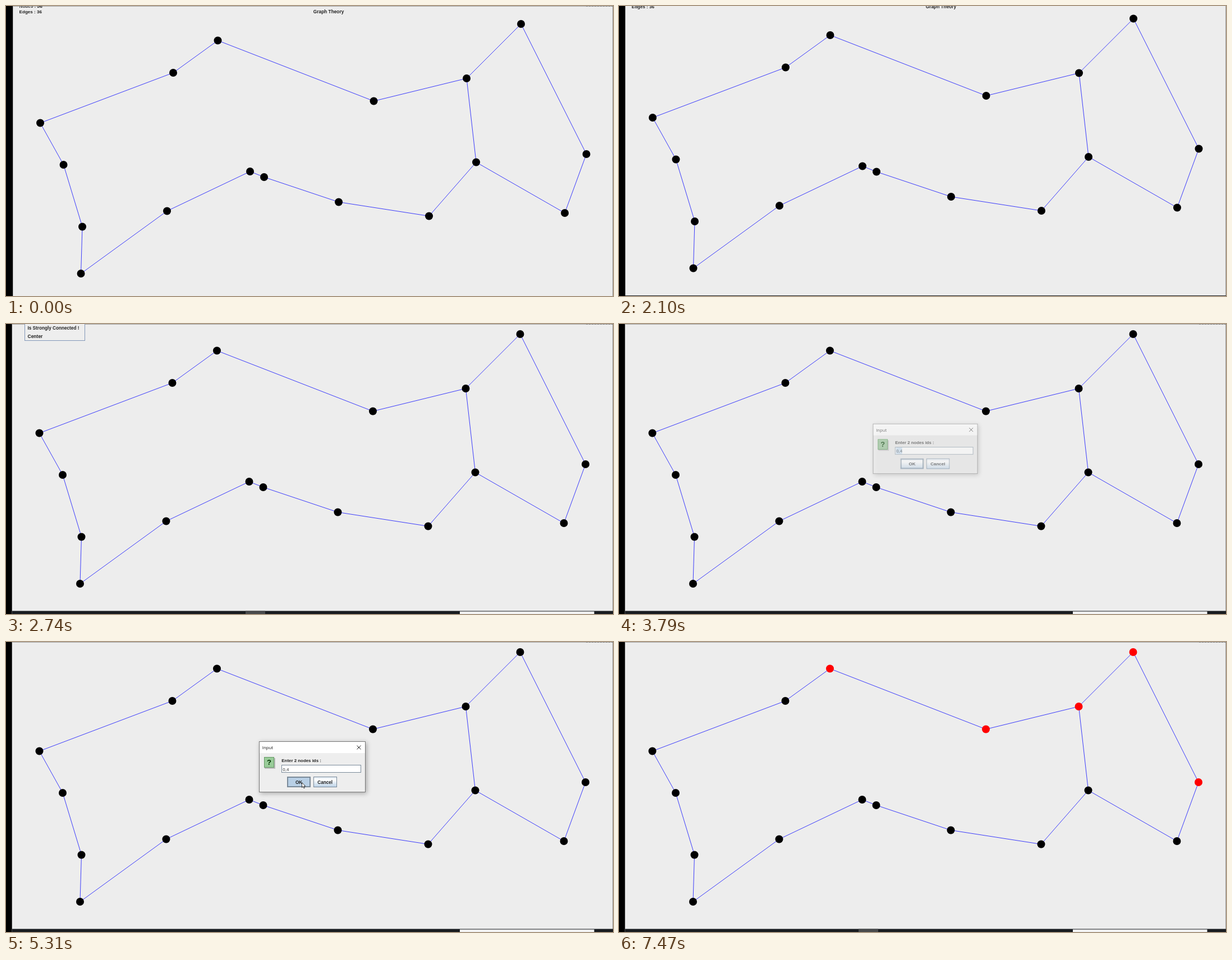
Recreate the animation shown at these times as an HTML page with a canvas. Size 1082 px wide and 517 px high, loop 8 s.

```html
<!DOCTYPE html>
<html lang="en">
<head>
<meta charset="utf-8">
<title>Graph traversal</title>
<style>
html, body { margin: 0; width: 100%; height: 100%; overflow: hidden; background: #ededed; }
canvas { display: block; }
</style>
</head>
<body>
<canvas id="stage" width="1082" height="517"></canvas>
<script>
const W = 1082, H = 517, LOOP = 8000;
const ctx = document.getElementById('stage').getContext('2d');
const BOLD = '"Liberation Sans", Arial, sans-serif';
const UI = '"Open Sans", sans-serif';

// A closed ring, in the order in which it is traversed, with one chord
const ring = [
  [376, 47.5], [654, 155.5], [819.5, 115], [916.5, 18], [1033, 250], [994.5, 355],
  [836.5, 264.5], [752.5, 360.5], [591.5, 335.5], [458.5, 291], [433.5, 281],
  [285.5, 351.5], [132, 463], [134.5, 379.5], [101, 269], [59.5, 194.5], [296.5, 105]
];
const chord = [ring[2], ring[6]];
const visitTime = i => i < 5 ? 5540 + 470 * i : Infinity;

// Curved pointer moves: each runs from..to, rests, and is hidden after `until`
const glides = [
  { from: 0, to: 250, until: 370, path: [[59, -8], [59, -8], [59, -9]] },
  { from: 3940, to: 4060, until: 4060, path: [[147, 24], [147, 24], [147, 24]] },
  { from: 4210, to: 4750, until: 5590, path: [[482, 228], [600, 340], [527, 250]] },
  { from: 5590, to: 5860, until: 6160, path: [[583, 278], [780, 320], [981, 356]] },
  { from: 6160, to: 6610, until: 6760, path: [[952, 352], [894, 350], [994, 472]] }
];

const between = (t, a, b) => t >= a && t < b;

function box(x, y, w, h, fill, stroke) {
  ctx.fillStyle = fill;
  ctx.fillRect(x, y, w, h);
  if (stroke) {
    ctx.strokeStyle = stroke;
    ctx.lineWidth = 1;
    ctx.strokeRect(x + 0.5, y + 0.5, w - 1, h - 1);
  }
}

function label(text, x, y, size = 8.3, color = '#222', weight = 'bold', family = BOLD) {
  ctx.font = `${weight} ${size}px ${family}`;
  ctx.fillStyle = color;
  ctx.fillText(text, x, y);
}

function polyline(points, color, width, closed) {
  ctx.beginPath();
  points.forEach(p => ctx.lineTo(...p));
  if (closed) ctx.closePath();
  ctx.strokeStyle = color;
  ctx.lineWidth = width;
  ctx.stroke();
}

function drawGraph(t, dx, dy) {
  ctx.save();
  ctx.translate(dx, dy);
  polyline(ring, '#0000ff', 0.75, true);
  polyline(chord, '#0000ff', 0.75);
  ring.forEach(([x, y], i) => {
    ctx.fillStyle = t >= visitTime(i) ? '#ff0000' : '#000';
    ctx.beginPath();
    ctx.arc(x, y, 7, 0, Math.PI * 2);
    ctx.fill();
  });
  ctx.restore();
}

function drawHeader(dx, dy) {
  const y = dy - 1;
  label('Nodes : 20', 22 + dx, y - 10.3, 8.1);
  label('Edges : 36', 22 + dx, y, 8.1);
  label('Graph Theory', 546.3 + dx, y);
}

function drawBorders(dx, dy) {
  box(0, 0, 10.7 + dx, H, '#000');
  box(W - 1, 0, 1, H, '#999');
  if (between(dy, 1, 14)) return;
  box(10.7 + dx, 0, W, 1, '#a3a3a3');
  for (let x = 1034; x < W; x += 5) box(x, 0, 3, 1, '#777');
}

function drawTaskbar(t, dy) {
  const y = 511.5 + dy;
  const active = between(t, 2620, 3790) || t >= 5470;
  box(11, y, W - 11, 10, '#191c20');
  if (active) box(427, y, 35, 10, '#484a4c');
  if (dy === 0) box(809, y + 1, 239.5, 10, '#f2f2f2');
  label('20:58', 63.5, y + 10, 7.6, '#ddd', 'normal', UI);
}

function drawMenu(dx, dy) {
  const x = Math.round(33 + dx);
  box(x, -20, 108, 50 + dy, '#eee', '#8297b8');
  label('Is Strongly Connected !', x + 5.5, 10 + dy, 8.2);
  label('Center', x + 5.5, 24.6 + dy, 8.5);
}

function button(x, text, textX, pressed, isDefault) {
  const fill = ctx.createLinearGradient(0, 240, 0, 259);
  fill.addColorStop(0, '#dde8f3');
  fill.addColorStop(0.3, '#ffffff');
  fill.addColorStop(1, '#b8cfe5');
  box(x, 240, 42, 19, pressed ? '#b8cfe5' : fill, '#7a8a99');
  if (isDefault) ctx.strokeRect(x + 1.5, 241.5, 39, 16);
  label(text, textX, 252.8, 8.2);
}

function drawDialog(t) {
  const pressed = t >= 5310;
  ctx.save();
  if (t < 3940) {
    ctx.globalAlpha = 0.55;
    ctx.translate(546, 222.5);
    ctx.scale(0.984, 0.984);
    ctx.translate(-546, -222.5);
  }
  ctx.save();
  ctx.shadowColor = 'rgba(0,0,0,.3)';
  ctx.shadowBlur = 8;
  ctx.shadowOffsetX = ctx.shadowOffsetY = 2;
  box(451, 177, 190, 91, '#eee');
  ctx.restore();
  box(451, 177, 190, 91, '#eee', '#777');
  box(452, 178, 188, 20, '#fff');
  label('Input', 456.8, 191, 7.8, '#111', 'normal', UI);
  polyline([[625.5, 184.5], [632.5, 191.5]], '#222', 1);
  polyline([[632.5, 184.5], [625.5, 191.5]], '#222', 1);

  box(461, 207, 19, 19, '#bbb');
  box(460, 205, 18, 19, '#99cc99', '#669966');
  label('?', 465, 219, 13, '#003300');

  label('Enter 2 nodes ids :', 491.3, 214.2, 7.9);
  box(491, 219, 142, 14, '#fff', '#7a8a99');
  if (!pressed) box(493, 220, 11, 12, '#b8cfe5');
  if (between(t, 4210, 4750)) box(503, 220, 1, 12, '#333');
  label('0,4', 493.3, 229.6, 8, '#333', 'normal');

  button(501, 'OK', 516, pressed, true);
  button(548, 'Cancel', 555.3, false, false);
  ctx.restore();
}

function pointerAt(t, { from, to, path: [a, b, c] }) {
  const steps = Math.round((to - from) / 140);
  const k = Math.min(1, Math.floor((t - from) / (to - from) * steps) / steps);
  const u = 1 - (1 - k) ** 2, v = 1 - u;
  return a.map((p, i) => v * v * p + 2 * u * v * b[i] + u * u * c[i]);
}

function drawPointer(t) {
  const glide = glides.find(g => between(t, g.from, g.until));
  if (!glide) return;
  const arrow = new Path2D('M.5 .5V9.4L2.5 7.5 4 10.8 5.4 10.2 4 7H6.6Z');
  ctx.save();
  ctx.translate(...pointerAt(t, glide));
  ctx.fillStyle = '#fff';
  ctx.strokeStyle = '#111';
  ctx.lineWidth = 0.8;
  ctx.fill(arrow);
  ctx.stroke(arrow);
  ctx.restore();
}

function render(t) {
  const dy = t < 2100 ? 14 : t < 2250 ? 4.5 : 0;
  const dx = dy / 9;
  box(0, 0, W, H, '#ededed');
  if (dy) drawHeader(dx, dy);
  drawGraph(t, dx, dy);
  drawBorders(dx, dy);
  drawTaskbar(t, dy);
  if (between(t, 1180, 1960) || between(t, 2620, 3790)) drawMenu(dx, dy);
  if (between(t, 3790, 5470)) drawDialog(t);
  drawPointer(t);
}

const start = performance.now();
function tick() {
  render((performance.now() - start) % LOOP);
  requestAnimationFrame(tick);
}
tick();
</script>
</body>
</html>
```
